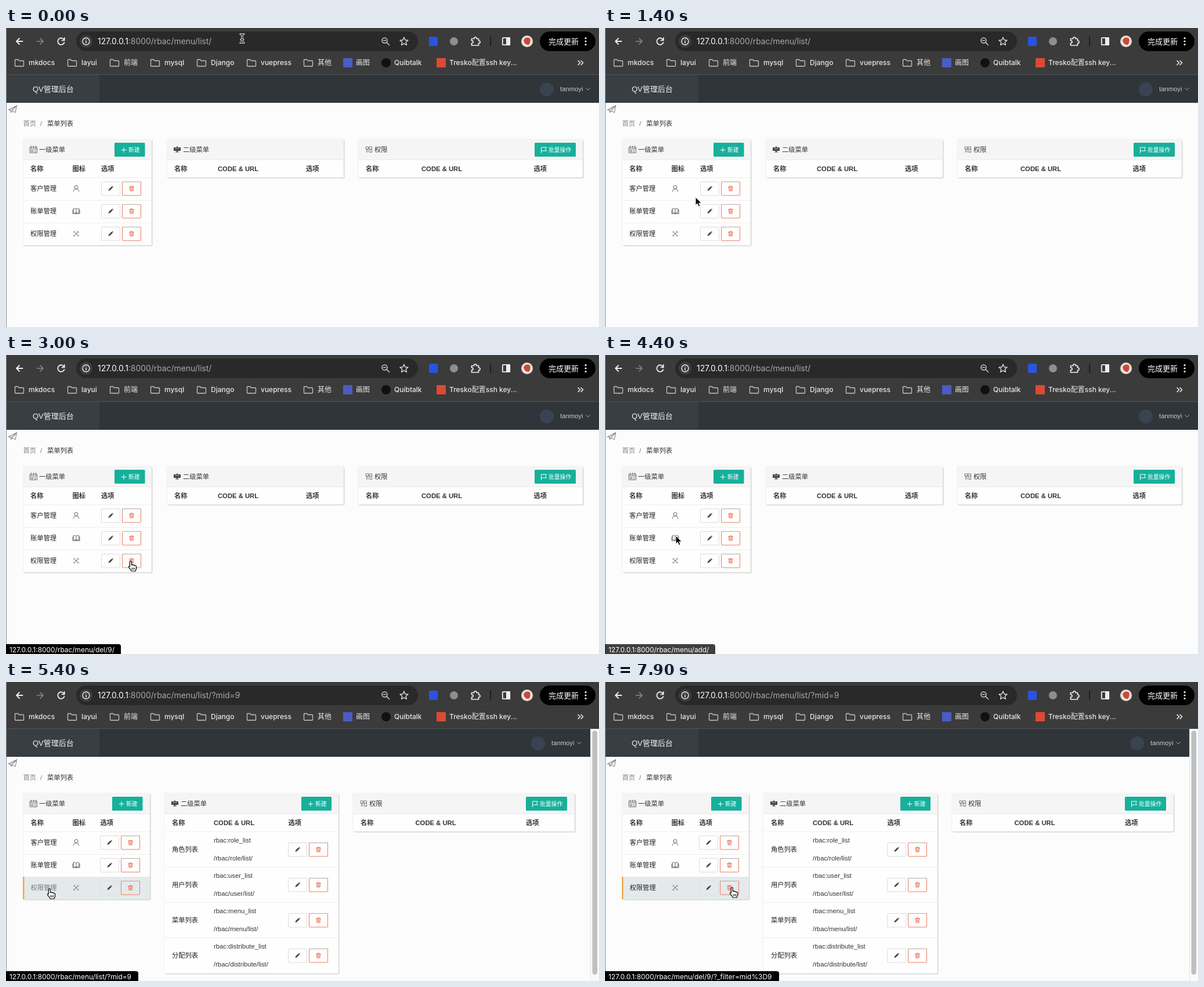
An HTML page that plays this animation: 1022 px wide and 516 px high, repeating every 8 s.

```html
<!DOCTYPE html>
<html lang="zh">
<head>
<meta charset="utf-8">
<style>
  html, body { margin: 0; width: 100%; height: 100%; overflow: hidden; background: #fcfcfc; }
  svg { display: block; width: 100vw; height: 100vh; }
  .chrome { font: 500 12px Inter, "Noto Sans CJK SC", "Noto Sans CJK", sans-serif; fill: #e8e8e8; }
  .page { font: 11.25px "Liberation Sans", "Noto Sans CJK SC", "Noto Sans CJK", sans-serif; fill: #333; }
  text { white-space: pre; }
  .line { fill: none; stroke: currentColor; stroke-linecap: round; stroke-linejoin: round; }
</style>
</head>
<body>
<svg id="stage" viewBox="0 0 1022 516" preserveAspectRatio="none"></svg>
<script>
const text = (x, y, s, attrs = '') => `<text x="${x}" y="${y}" ${attrs}>${s.replace(/&/g, '&amp;')}</text>`;
const rect = (x, y, w, h, fill, attrs = '') => `<rect x="${x}" y="${y}" width="${w}" height="${h}" fill="${fill}" ${attrs}/>`;
const circle = (x, y, r, fill, attrs = '') => `<circle cx="${x}" cy="${y}" r="${r}" fill="${fill}" ${attrs}/>`;
const line = (x, y, d, color, width = 1) =>
  `<path class="line" transform="translate(${x} ${y})" d="${d}" color="${color}" stroke-width="${width}"/>`;
const shape = (x, y, d, fill) => `<path transform="translate(${x} ${y})" d="${d}" fill="${fill}"/>`;

const icons = {
  user: 'M-3-2.4a3 3 0 1 0 6 0a3 3 0 1 0-6 0M-4.8 5C-4.5 2-2.5 1 0 .8S4.5 2 4.8 5',
  book: 'M0-3.5C-1.5-5-3.5-5-4.8-4.2V3C-3 2.3-1 2.6 0 4C1 2.6 3 2.3 4.8 3V-4.2C3.5-5 1.5-5 0-3.5V4M-4.8-2H-6V4.5H6V-2H4.8',
  tools: 'M-4 4L3.5-3.5M-3.5-3.5L4 4M-4.5-2.5L-2.5-4.5M2.2-4.5L4.6-2.3M2.5 4.5L4.5 2.5M-4.7 2.5L-2.5 4.7',
  trash: 'M-4-2.7H4M-1.5-2.8V-4H1.5V-2.8M-3-2.5L-2.6 4H2.6L3-2.5M-1-1V2.7M1-1V2.7',
  flag: 'M-4.5 5V-4.5H4.5L2.5-1.5L4.5 1.5H-4.5',
  plus: 'M-4 0H4M0-4V4'
};
const pencil = 'M-4 4L-3.3 1.3L1.6-3.4L3.5-1.5L-1.4 3.3ZM2.1-3.9L3-4.6L4.5-3L4-2.1Z';

function browser() {
  const folder = x => line(x, 53, 'M1 1.5H5.5L7.5 3.5H14.5Q15.5 3.5 15.5 4.5V12Q15.5 13 14.5 13H1.5Q.5 13 .5 12V2.2Q.5 1.5 1 1.5Z', '#c4c4c4', 1.3);
  const folders = [[15, 'mkdocs'], [106, 'layui'], [179, '前端'], [249, 'mysql'], [329, 'Django'], [415, 'vuepress'], [513, '其他']];
  const white = '#eee';
  return `<g class="chrome">` + rect(0, 0, 1022, 81, '#3b3b3c') + rect(121, 6, 589, 34, '#29292a', 'rx="17"') +
    line(23, 23, 'M5.5 0H-5M0-5L-5 0L0 5', white, 1.8) +
    line(59, 23, 'M-5.5 0H5M0-5L5 0L0 5', '#888', 1.6) +
    line(95, 23, 'M5.5-2A5.8 5.8 0 1 0 5.5 2.2M5.7-6V-1.7H1.4', white, 1.8) +
    circle(138, 23, 11, '#3d3d3e') + circle(138, 23, 6, 'none', 'stroke="#eee" stroke-width="1.4"') +
    line(138, 23, 'M0-.2V3M0-2.8V-2.7', white, 1.5) +
    line(652.5, 21.5, 'M-4.5 0a4.5 4.5 0 1 0 9 0a4.5 4.5 0 1 0-9 0M3.4 3.4L8 8M-2 0H2', '#ccc', 1.5) +
    line(686, 23, 'M0-7L2-2.2L7-1.8L3.2 1.5L4.4 6.5L0 3.8L-4.4 6.5L-3.2 1.5L-7-1.8L-2-2.2Z', '#ddd', 1.4) +
    rect(729, 15, 15, 16, '#2854df', 'rx="2"') + circle(772, 23, 7, '#8b8f92') +
    line(809, 23, 'M-6.5-4.5H-2.2C-3-8.2 2.8-8.2 2-4.5H5.5V-1C9-1.6 9 4 5.5 3.3V7H-6.5V3C-3 3.5-3-1.5-6.5-1Z', white, 1.7) +
    rect(834.5, 15, 1.5, 16, '#151515') +
    rect(855.8, 16.8, 12.4, 12.4, 'none', 'stroke="#eee" stroke-width="1.8" rx="1"') + rect(862, 16, 7, 14, white) +
    circle(898, 23, 10, '#ece0d9') + shape(898, 23, 'M-6-2Q-2-9 5-5Q7 1 3 6Q-4 7-6-2Z', '#c64a38') +
    rect(920, 6, 96, 34, '#000', 'rx="17"') + text(935, 28, '完成更新', 'font-size="13" fill="#fff"') +
    [-5.5, 0, 5.5].map(dy => circle(999, 23 + dy, 1.6, '#fff')).join('') +
    folders.map(([x, s]) => folder(x) + text(x + 24, 64.3, s)).join('') +
    rect(581, 52, 16, 16, '#4b5cc4', 'rx="1"') + text(603, 64.3, '画图') +
    circle(655, 60, 8, '#111') + text(669, 64.3, 'Quibtalk') +
    rect(742, 52, 16, 16, '#dc4a34', 'rx="1"') + text(764, 64.3, 'Tresko配置ssh key...') +
    line(990, 60, 'M-4-3.5L-.5 0L-4 3.5M1-3.5L4.5 0L1 3.5', white, 1.6) + '</g>';
}

function actions(x, y) {
  return rect(x + .5, y - 11.5, 32, 23.5, 'none', 'stroke="#dcdcdc" rx="1"') + shape(x + 16.5, y, pencil, '#444') +
    rect(x + 36.5, y - 11.5, 32, 23.5, 'none', 'stroke="#ee7c5e" rx="1"') + rect(x + 36, y - 12, 33, 1, '#b5aaa5') +
    line(x + 52.5, y, icons.trash, '#ed6a49');
}

const button = (x, w, icon, label, labelX) => rect(x, 198, w, 24, '#16b09b', 'rx="1.5"') +
  line(x + 16, 210.5, icon, '#fff') + text(x + labelX, 214, label, 'font-size="9.8" font-weight="500" fill="#fff"');

function card(x, right, bottom, title, titleX, heads, columns) {
  const w = right - x;
  return rect(x + 1.5, 193.5, w, bottom - 192, '#d2d2d2', 'rx="2"') + rect(x, 192, w, bottom - 192, '#fefefe', 'stroke="#e9e9e9" stroke-width=".7"') +
    rect(x, 192, w, 35, '#f5f5f5') + rect(x, 227, w, 1, '#eaeaea') + text(titleX, 214, title) +
    heads.map((s, i) => text(columns[i], 247, s, 'font-weight="bold"')).join('');
}

function scene(opened) {
  const pick = (a, b) => opened ? b : a;
  const edge = pick(1022, 1007), shift = pick(0, -15);
  const right1 = pick(251, 248), cols1 = pick([42, 114.5, 164], [42.5, 114.5, 162.5]);
  const x2 = pick(277, 273), right2 = pick(582, 573), cols2 = pick([290, 365, 517], [286, 358, 486.5]);
  const x3 = pick(607, 598), right3 = pick(994, 980), cols3 = pick([620, 716, 909.5], [611, 705.5, 896]);
  const codeHeads = ['名称', 'CODE & URL', '选项'];

  let out = rect(0, 81, edge, 48, '#2f3538') + rect(0, 81, 161, 48, '#373f43') + rect(0, 80, 1022, 1, '#515456') + rect(0, 128, edge, 1, '#24282b') +
    text(46, 109.5, 'QV管理后台', 'font-size="13" font-weight="500" fill="#f4f4f4"') +
    circle(932 + shift, 106, 12, '#3a4351') + text(955 + shift, 109, 'tanmoyi', 'fill="#c9cccd"') +
    line(1003 + shift, 105, 'M-3.5-1.5L0 2L3.5-1.5', '#aaa') +
    line(11.5, 140, 'M-7 1L7-6L4.5 6L-1 3L-3 6L-3.4 2.3ZM7-6L-1 3M7-6L-3.4 2.3', '#777') +
    text(29.5, 169, '首页', 'fill="#808080"') + text(59, 169, '/', 'fill="#777"') + text(71, 169, '菜单列表');

  out += card(29.5, right1, 375, '一级菜单', 57, ['名称', '图标', '选项'], cols1) +
    line(47.5, 210, 'M-6-4.5H6V5.5H-6ZM-6-1.5H6M-4-6.5V-3M4-6.5V-3M0-6.5V-3M-4 1H-1V3.5H-4ZM1.5 1H4M1.5 3.5H4', '#666', .9) +
    button(pick(187, 183), 52.5, icons.plus, '新建', 24);
  [['客户管理', 'user'], ['账单管理', 'book'], ['权限管理', 'tools']].forEach(([name, icon], i) => {
    const y = 277 + i * 39, last = i === 2;
    if (opened && last) out += rect(29, 336, right1 - 29, 39, '#e4eaec') + rect(29, 336, 2.5, 39, '#f2a94c');
    else out += rect(30, y - 19, right1 - 30, 1, '#eee');
    out += text(cols1[0], y + 4, name, `font-weight="500" fill="#222" ${last ? 'class="target"' : ''}`) +
      line(121, y, icons[icon], '#555', .9) + actions(cols1[2] - pick(0, .5), y);
  });

  out += card(x2, right2, pick(258, 503), '二级菜单', x2 + 28, codeHeads, cols2) +
    shape(x2 + 18, 209.5, 'M-6-3.5H-1V-5H1V-3.5H6V2.5H1V4H3V5H-3V4H-1V2.5H-6Z', '#444') + rect(x2 + 14, 207.5, 8, 1, '#bbb');
  if (opened) {
    out += button(509, 52, icons.plus, '新建', 24);
    [['角色列表', 'role'], ['用户列表', 'user'], ['菜单列表', 'menu'], ['分配列表', 'distribute']].forEach(([name, key], i) => {
      const y = 288.5 + i * 61.1;
      out += rect(x2, Math.round(y - 30.5), right2 - x2, 1, '#eee') + text(286, y + 4, name, 'font-weight="500" fill="#222"') +
        text(358, y - 11.5, `rbac:${key}_list`) + text(358, y + 19, `/rbac/${key}/list/`) + actions(486, Math.round(y));
    });
    out += rect(1007, 81, 15, 435, '#fafafa') + rect(1007, 81, 1, 435, '#e6e6e6') + rect(1010.5, 84, 8.5, 421, '#bfbfbf', 'rx="4.2"');
  }

  out += card(x3, right3, 258, '权限', x3 + 28, codeHeads, cols3) +
    line(x3 + 18.5, 209.5, 'M-5-4.5H-1V-.5H-5ZM1-4.5H5V-.5H1ZM-4 -.5V5M-1.5-.5V5M1.5-.5V5H5V-.5', '#666', .9) +
    button(pick(911, 896), 71, icons.flag, '批量操作', 24);
  return `<g class="page">${out}</g>`;
}

const outline = 'fill="none" stroke-linecap="round"';
const beam = 'M-3-7.5Q0-7.5 0-5.5V5.5Q0 7.5-3 7.5M3-7.5Q0-7.5 0-5.5M3 7.5Q0 7.5 0 5.5M-2 2H2';
const cursors = {
  beam: `<path d="${beam}" ${outline} stroke="#eee" stroke-width="3.2"/><path d="${beam}" ${outline} stroke="#111" stroke-width="1.2"/>`,
  arrow: '<path d="M0 0V14L3.3 11L5.6 16.3L8 15.3L5.8 10.2H10.2Z" fill="#000" stroke="#fff"/>',
  hand: '<path d="M-1.7 1.2a1.5 1.5 0 0 1 3 0V6.2c1-.9 2.7-.6 3 .6 1-.7 2.5-.3 2.7.9 1.2-.6 2.6 0 2.6 1.6v3.2c0 2-1.4 2.6-1.4 4.5H1.2c-.4-2.2-3.4-4.3-4.6-6.8-.7-1.6.9-2.3 1.7-1.3Z" fill="#fff" stroke="#000" stroke-width="1.2"/>' +
    '<path d="M2 11V14.5M4.3 11V14.5M6.6 11V14.5" stroke="#000"/>'
};

const host = '127.0.0.1', root = ':8000/rbac/menu/';
const stage = document.getElementById('stage');
stage.innerHTML = rect(0, 0, 1022, 516, '#fcfcfc') + browser() +
  `<g id="before">${scene(false)}</g><g id="after">${scene(true)}</g>` + rect(0, 0, 1, 516, '#8d8d8d') +
  `<text class="chrome" x="158" y="28" style="font-size:13.9px;font-weight:400"><tspan fill="#fff">${host}</tspan><tspan id="address" fill="#a9a9a9"></tspan></text>` +
  `<g id="status"><path id="statusBox"/><text id="statusText" class="chrome" x="6" y="513" style="font-size:11.9px;font-weight:400;fill:#fff"></text></g>` +
  `<g id="cursor">${Object.entries(cursors).map(([id, body]) => `<g id="${id}">${body}</g>`).join('')}</g>`;
const get = id => document.getElementById(id);
const show = (id, on) => { get(id).style.display = on ? '' : 'none'; };

// time, x, y, pointer, linked path, width of the status box
const path = [
  [0, 407, 18, 'beam'], [300, 407, 18, 'beam'], [450, 378, 50, 'arrow'], [1200, 156, 292, 'arrow'], [1900, 156, 292, 'arrow'],
  [2400, 215, 356, 'hand', 'del/9/', 198], [3100, 215, 356, 'arrow', 'del/9/', 198],
  [3700, 213, 209, 'hand', 'add/', 190], [4100, 213, 209, 'arrow', 'add/', 190], [4400, 122, 312, 'arrow', 'add/', 190],
  [4700, 75, 357, 'hand', 'list/?mid=9', 228], [5500, 75, 357, 'arrow', 'list/?mid=9', 228],
  [6100, 219, 355, 'hand', 'del/9/?_filter=mid%3D9', 300], [8000, 219, 355, 'hand']
];
const loadTime = 5100;

function draw(now) {
  const t = Math.floor(now % 8000 / 100) * 100;
  const i = path.findLastIndex(key => key[0] <= t);
  const [t0, x0, y0, pointer, link, width] = path[i], [t1, x1, y1] = path[i + 1];
  const p = (t - t0) / (t1 - t0), eased = p * p * (3 - 2 * p);
  get('cursor').setAttribute('transform', `translate(${x0 + (x1 - x0) * eased} ${y0 + (y1 - y0) * eased})`);
  for (const id in cursors) show(id, id === pointer);

  const loaded = t >= loadTime;
  show('before', !loaded);
  show('after', loaded);
  get('address').textContent = root + (loaded ? 'list/?mid=9' : 'list/');
  const hovered = pointer === 'hand' && link === 'list/?mid=9';
  document.querySelectorAll('.target').forEach(el => el.setAttribute('fill', hovered ? '#777' : '#222'));

  show('status', link);
  if (link) {
    get('statusText').textContent = host + root + link;
    get('statusBox').setAttribute('d', `M0 499H${width - 4}Q${width} 499 ${width} 503V516H0Z`);
    get('status').setAttribute('opacity', t > 4200 && t < 4700 ? Math.max(0, 1 - (t - 4200) / 800) : 1);
  }
}

const start = performance.now();
(function loop() {
  draw(performance.now() - start);
  requestAnimationFrame(loop);
})();
</script>
</body>
</html>
```
